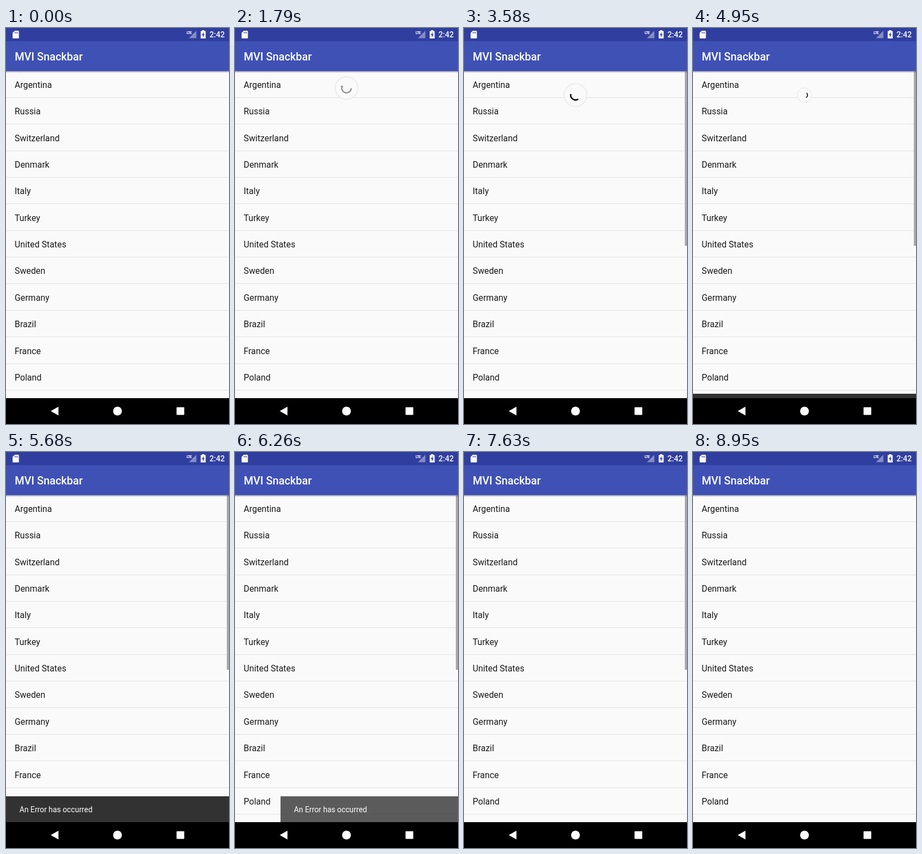
Recreate the animation shown at these times as an HTML page. Size 406 by 720 pixels, loop 9.01 s.

```html
<!DOCTYPE html>
<html lang="en">
<head>
<meta charset="utf-8">
<title>Snackbar demo</title>
<style>
  html, body { margin: 0; width: 100%; height: 100%; overflow: hidden; background: #fafafa; }
  svg { display: block; width: 406px; height: 720px; font-family: Roboto, sans-serif; }
  #list text { font-size: 15.8px; fill: #1a1a1a; }
  #list line { stroke: #e1e1e1; }
  .title { font-size: 19.75px; font-weight: 500; fill: #fff; }
  .clock { font-size: 14px; font-weight: 500; fill: #fff; }
  .lte { font-size: 7px; font-weight: 700; letter-spacing: -.8px; fill: #fff; }
  #message { font-size: 13.8px; fill: #fff; }
</style>
</head>
<body>
<svg viewBox="0 0 406 720">
  <defs>
    <linearGradient id="shade" x2="0" y2="1">
      <stop stop-color="#000" stop-opacity=".35"/>
      <stop offset="1" stop-color="#000" stop-opacity="0"/>
    </linearGradient>
  </defs>
  <rect width="406" height="720" fill="#fafafa"/>
  <g id="list"></g>
  <rect id="scrollbar" x="402" y="79" width="4" height="317" fill="#a8a8a8"/>

  <g id="spinner">
    <circle r="20.7" fill="#fafafa" stroke="#ebebeb" stroke-width="2"/>
    <path id="arc" fill="none" stroke="#000" stroke-width="2.5"/>
    <path id="arrow" d="M-4.5 0H4.5L0 4.5Z"/>
  </g>

  <g id="snackbar">
    <rect width="406" height="48" fill="#323232"/>
    <text id="message" x="24.5" y="28.5">An Error has occurred</text>
  </g>

  <rect y="78" width="406" height="4" fill="url(#shade)"/>
  <rect y="24" width="406" height="54.5" fill="#3f51b5"/>
  <text class="title" x="16" y="58.5">MVI Snackbar</text>

  <rect width="406" height="24" fill="#303f9f"/>
  <path d="M16 5H22Q23.5 5 23.5 6.5V17.5Q23.5 19 22 19H13.5Q12 19 12 17.5V9Z" fill="#fff"/>
  <path d="M16.5 7V10M18.8 7V10M21 7V10" stroke="#303f9f"/>
  <path d="M346.5 5V18.5H333Z" fill="#838cc5"/>
  <text class="lte" x="328.8" y="11">LTE</text>
  <path d="M357 5.5V4H361V5.5H363.5V19H354.5V5.5Z" fill="#fff"/>
  <path d="M359.7 7.5L356.5 13H358.5V17L361.7 11.5H359.7Z" fill="#303f9f"/>
  <text class="clock" x="370.5" y="17">2:42</text>

  <rect y="673" width="406" height="47" fill="#000"/>
  <path d="M81.5 696.5L95.5 688.5V704.5Z" fill="#fff"/>
  <circle cx="203" cy="696.5" r="8" fill="#fff"/>
  <rect x="310.5" y="689.5" width="14" height="14" rx="1" fill="#fff"/>
</svg>
<script>
const LOOP = 9010;
const $ = id => document.getElementById(id);
const clamp = v => Math.min(1, Math.max(0, v));
const progress = (t, from, length) => clamp((t - from) / length);

// Material "fast out, slow in": cubic-bezier(.4, 0, .2, 1)
function ease(x) {
  let lo = 0, hi = 1, s = x;
  for (let i = 0; i < 18; i++) {
    s = (lo + hi) / 2;
    const u = 1 - s;
    if (3 * u * u * s * .4 + 3 * u * s * s * .2 + s ** 3 < x) lo = s; else hi = s;
  }
  return s * s * (3 - 2 * s);
}

// Piecewise linear interpolation through [time, value] pairs
function track(t, points) {
  if (t <= points[0][0]) return points[0][1];
  for (let i = 1; i < points.length; i++) {
    const [a, from] = points[i - 1], [b, to] = points[i];
    if (t < b) return from + (to - from) * (t - a) / (b - a);
  }
  return points[points.length - 1][1];
}

const REST_Y = 122, START_Y = 59, PULL = REST_Y - START_Y;
const RELEASE = 3140, REFRESH = 3340, DONE = 4896, CYCLE = 1332;
const pullPath = [[1470, START_Y], [1790, 109], [2210, 161], [2530, 163], [2790, 163], [2890, 134]];
const swipePath = [[6100, 0], [6260, 82], [6370, 175], [6470, 270], [6630, 406]];

const countries = ["Argentina", "Russia", "Switzerland", "Denmark", "Italy", "Turkey",
  "United States", "Sweden", "Germany", "Brazil", "France", "Poland"];
$("list").innerHTML = countries.map((name, i) => {
  const baseline = Math.round(108.95 + i * 48.36), lineY = baseline + 17.5;
  return `<text x="15.8" y="${baseline}">${name}</text><line x2="406" y1="${lineY}" y2="${lineY}"/>`;
}).join("");

function drawArc(start, sweep) {
  const point = degrees => {
    const a = degrees * Math.PI / 180;
    return `${8.7 * Math.cos(a)} ${8.7 * Math.sin(a)}`;
  };
  $("arc").setAttribute("d",
    `M${point(start)}A8.7 8.7 0 ${sweep > 180 ? 1 : 0} 1 ${point(start + sweep)}`);
}

function drawSpinner(t) {
  const visible = t > 1470 && t < DONE + 150;
  $("spinner").style.display = visible ? "" : "none";
  if (!visible) return;

  let y = track(t, pullPath);
  const pulled = (y - START_Y) / PULL;
  const dragging = t < REFRESH;
  if (dragging) {
    const reach = Math.max(0, Math.min(1, pulled) - .4) / .6;
    const tension = Math.max(0, pulled - 1) / 2;
    const start = 180 * (-.25 + .4 * reach + 2 * tension), sweep = 288 * reach;
    drawArc(start, sweep);
    $("arrow").setAttribute("transform",
      `rotate(${start + sweep}) translate(8.7 0) scale(${reach})`);
    y += (REST_Y - y) * ease(progress(t, RELEASE, REFRESH - RELEASE));
  } else {
    y = REST_Y;
    const turns = (t - REFRESH) / CYCLE + .5;
    const phase = turns % 1;
    const grow = ease(clamp(phase * 2)), shrink = ease(clamp(phase * 2 - 1));
    const sweep = 360 * (.01 + .79 * (grow - shrink));
    const end = 70 + 216 * turns + 360 * (.21 * phase + .79 * grow);
    drawArc(end - sweep, sweep);
  }
  $("arrow").style.display = dragging ? "" : "none";
  const opacity = dragging && pulled < 1 ? .4 : 1;
  $("arc").style.opacity = $("arrow").style.opacity = opacity;
  const scale = 1 - progress(t, DONE, 150);
  $("spinner").setAttribute("transform", `translate(203 ${y}) scale(${scale})`);
}

function drawSnackbar(t) {
  const x = track(t, swipePath);
  const y = 673 - 47 * ease(progress(t, DONE, 250));
  $("snackbar").setAttribute("transform", `translate(${x} ${y})`);
  $("snackbar").style.opacity = t < DONE ? 0 : 1 - clamp((x / 406 - .1) / .5);
  $("message").style.opacity = progress(t, DONE + 70, 180);
}

function frame(now) {
  const t = now % LOOP;
  drawSpinner(t);
  drawSnackbar(t);
  $("scrollbar").style.opacity = t < RELEASE ? 0 : 1 - progress(t, 8630, 280);
  requestAnimationFrame(frame);
}
requestAnimationFrame(frame);
</script>
</body>
</html>
```
